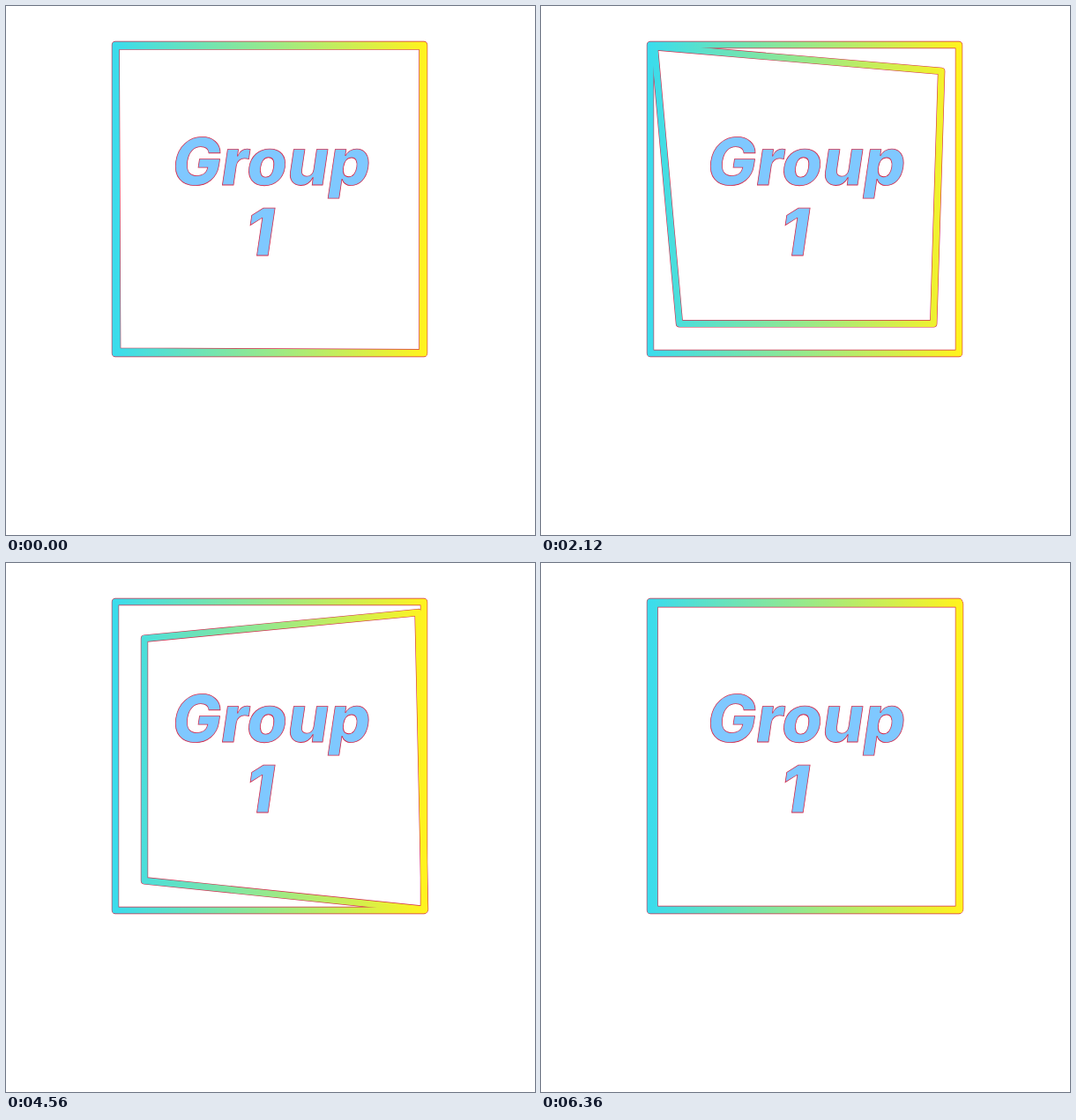
Write an HTML page that moves like this. It is 600x600 px and loops after 6.4 s.

```html
<!DOCTYPE html>
<html lang="en">
<head>
<meta charset="utf-8">
<title>Group 1</title>
<style>
  html, body { margin: 0; width: 100%; height: 100%; overflow: hidden; background: #fff; }
  svg { display: block; width: 100vw; height: 100vh; }

  .edge, .band { fill: none; stroke-linejoin: round; }
  .edge { stroke: #d3284a; stroke-width: 8.4; }
  .band { stroke: url(#sweep); stroke-width: 7.2; }

  text {
    font: 800 74px Inter, "Open Sans", sans-serif;
    letter-spacing: 0;
    text-anchor: middle;
    fill: #7fc8ff;
    stroke: #d3284a;
    stroke-width: .8;
  }
</style>
</head>
<body>
<svg viewBox="0 0 600 600">
  <defs>
    <linearGradient id="sweep" gradientUnits="userSpaceOnUse" x1="124" x2="474">
      <stop offset="0" stop-color="#3bdcec"/>
      <stop offset=".5" stop-color="#97e98b"/>
      <stop offset="1" stop-color="#fff31f"/>
    </linearGradient>
    <rect id="square" x="124" y="44" width="350" height="350"/>
    <polygon id="quad"/>
  </defs>

  <!-- Both edges lie under both bands, so only the joint outline shows -->
  <g class="edge"><use href="#square"/><use href="#quad"/></g>
  <g class="band"><use href="#square"/><use href="#quad"/></g>

  <text transform="translate(298 203) skewX(-8.4)">Group</text>
  <text transform="translate(285 283) skewX(-8.4)">1</text>
</svg>
<script>
  const STEP = 40, STEPS = 20;
  const quad = document.getElementById("quad");

  // Corners run clockwise from the top left
  const box = (l, t, r, b) => [[l, t], [r, t], [r, b], [l, b]];
  const rest = box(124.5, 45.5, 472.3, 393.3);
  const wide = box(128.7, 46.2, 475, 393);
  const tight = box(157, 85.7, 445.2, 360.3);

  // Each corner goes in once, then out once
  const inward = [3, 2, 1, 0], outward = [2, 1, 0, 3];
  const poses = [wide];
  const move = (corner, to) => poses.push(poses.at(-1).with(corner, to[corner]));
  inward.forEach(c => move(c, tight));
  outward.forEach(c => move(c, wide));
  poses[0] = rest;

  const mix = (a, b, u) => a + (b - a) * u;
  const start = performance.now();

  function draw() {
    const n = Math.floor((performance.now() - start + 1) / STEP) % (STEPS * (poses.length - 1));
    const leg = Math.floor(n / STEPS), u = (n % STEPS + 1) / STEPS;
    const points = poses[leg].map((p, i) => p.map((v, k) => mix(v, poses[leg + 1][i][k], u)));
    quad.setAttribute("points", points.join(" "));
    requestAnimationFrame(draw);
  }
  draw();
</script>
</body>
</html>
```
